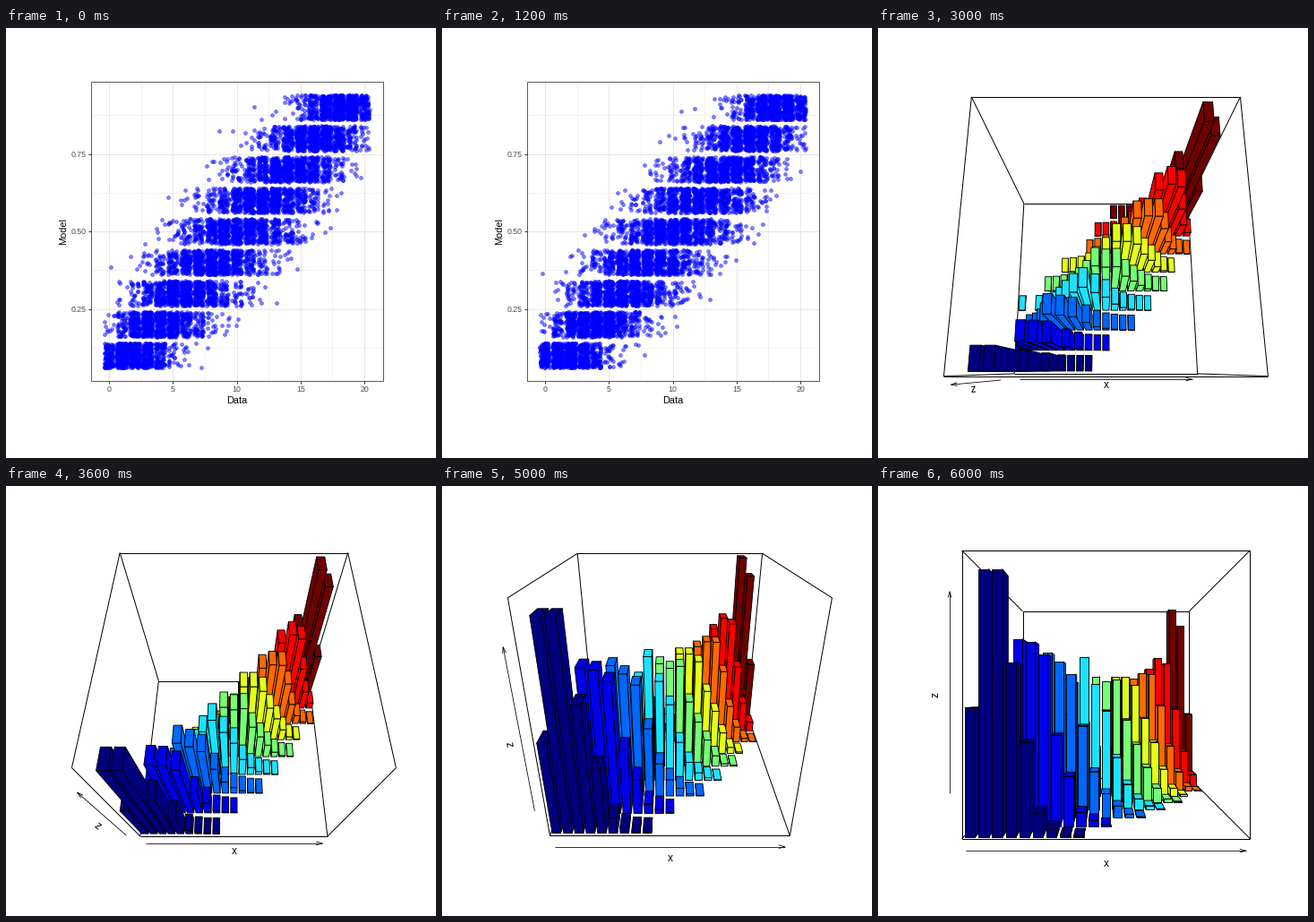
Recreate the animation shown at these times as a matplotlib script. Size 480x480 px, loop 6.6 s.

```python
import numpy as np
import matplotlib
import matplotlib.pyplot as plt
from matplotlib.animation import FuncAnimation
from matplotlib.collections import LineCollection, PolyCollection

matplotlib.rcParams["font.family"] = "Liberation Sans"

SIZE, DPI = 480, 100
STEP_MS, FRAMES = 200, 33
PX = 72 / DPI                       # one pixel in points

# Histogram per model row: first x value, then counts per thousand
ROWS = [
    (0, [136, 282, 282, 184, 100, 25, 9, 2, 1]),
    (0, [11, 57, 137, 213, 210, 196, 104, 57, 16, 7, 2]),
    (1, [7, 28, 72, 130, 201, 190, 175, 112, 56, 29, 14, 4, 1]),
    (0, [1, 0, 3, 12, 35, 75, 124, 166, 199, 164, 129, 68, 33, 14, 5, 1]),
    (3, [1, 5, 15, 37, 65, 110, 175, 168, 171, 115, 81, 49, 20, 5, 2]),
    (5, [1, 5, 14, 35, 71, 117, 176, 176, 164, 115, 80, 40, 12, 3]),
    (8, [4, 12, 31, 65, 114, 175, 183, 182, 133, 70, 30, 7, 1]),
    (9, [1, 2, 7, 22, 55, 109, 192, 210, 201, 126, 57, 19]),
    (11, [1, 1, 2, 9, 32, 90, 190, 297, 269, 116]),
]
COLORS = ["#00007f", "#0000eb", "#0068ff", "#1ae3ff", "#75ff75",
          "#e3ff1a", "#ff6800", "#ff0000", "#700000"]
CELLS = [(row, start + i, n) for row, (start, counts) in enumerate(ROWS)
         for i, n in enumerate(counts) if n]
NX, NY, TOP = 21, len(ROWS), 300

# 3D view: cube of half size 1, fitted into the plot region
DIST = np.sqrt(3) + 2
CX, CY = 254.4, 232.8
FIT_W, FIT_H = 362.0, 321.8

# Faces of a box as corner signs, with outward normal (axis, sign)
FACES = []
for axis in range(3):
    a, b = [i for i in range(3) if i != axis]
    for sign in (-1, 1):
        quad = []
        for u, v in ((-1, -1), (1, -1), (1, 1), (-1, 1)):
            p = [0, 0, 0]
            p[axis], p[a], p[b] = sign, u, v
            quad.append(tuple(p))
        FACES.append((axis, sign, quad))

fig = plt.figure(figsize=(SIZE / DPI, SIZE / DPI), dpi=DPI, facecolor="white")
ax = fig.add_axes([0, 0, 1, 1])


def reset():
    ax.clear()
    ax.set_xlim(0, SIZE)
    ax.set_ylim(SIZE, 0)
    ax.axis("off")


def text(x, y, s, size, color="black", **kw):
    ax.text(x, y, s, fontsize=size * PX, color=color, **kw)


def lines(segs, color, width, z):
    ax.add_collection(LineCollection(segs, colors=color,
                                     linewidths=width * PX, zorder=z))


# ---- jittered scatter -------------------------------------------------

def sx(v):
    return 115 + 14.25 * v


def sy(v):
    return 227 - 346 * (v - 0.5)


def draw_scatter(seed):
    left, right, top, bottom = 95, 420.5, 59.5, 394
    xs, ys = np.arange(0, 21, 5), np.array([0.25, 0.5, 0.75])
    vert = lambda vs: [[(sx(v), top), (sx(v), bottom)] for v in vs]
    horz = lambda vs: [[(left, sy(v)), (right, sy(v))] for v in vs]
    lines(vert(xs[:-1] + 2.5) + horz(np.arange(0.125, 1, 0.25)),
          "#ebebeb", 0.6, 1)
    lines(vert(xs) + horz(ys), "#e6e6e6", 1, 1)

    rng = np.random.default_rng(seed)
    n = [c[2] for c in CELLS]
    px = np.repeat([c[1] for c in CELLS], n).astype(float)
    py = np.repeat([0.1 * (c[0] + 1) for c in CELLS], n)
    px += rng.uniform(-0.4, 0.4, px.size)
    py += rng.uniform(-0.04, 0.04, py.size)
    blue = (0, 0, 1, 0.5)
    ax.scatter(sx(px), sy(py), s=(3.9 * PX) ** 2, facecolors=[blue],
               edgecolors=[blue], linewidths=0.7 * PX, zorder=2)

    ax.add_patch(plt.Rectangle((left, top), right - left, bottom - top,
                               fill=False, ec="#333333", lw=0.8 * PX, zorder=3))
    lines([[(sx(v), bottom), (sx(v), bottom + 3)] for v in xs]
          + [[(left - 3, sy(v)), (left, sy(v))] for v in ys],
          "#333333", 1, 3)
    for v in xs:
        text(sx(v), 406.2, str(v), 8.8, "#4d4d4d", ha="center", va="baseline")
    for v in ys:
        text(90, sy(v) + 3.2, f"{v:.2f}", 8.8, "#4d4d4d",
             ha="right", va="baseline")
    text(257.5, 419, "Data", 11, ha="center", va="baseline")
    text(64, 227, "Model", 11, ha="center", va="center", rotation=90)


# ---- perspective histogram --------------------------------------------

class View:
    def __init__(self, phi):
        self.s, self.c = np.sin(np.radians(phi)), np.cos(np.radians(phi))
        self.eye = DIST * np.array([0, -self.c, self.s])
        self.f, self.mid = 1, np.zeros(2)
        corners = [p for face in FACES for p in face[2]]
        q = self.raw(corners)
        lo, hi = q.min(axis=0), q.max(axis=0)
        self.f = min(FIT_W / (hi - lo)[0], FIT_H / (hi - lo)[1])
        self.mid = (lo + hi) / 2

    def raw(self, pts):
        x, y, z = np.asarray(pts, float).T
        w = DIST + y * self.c - z * self.s
        return np.column_stack([x / w, (y * self.s + z * self.c) / w])

    def __call__(self, pts):
        q = (self.raw(pts) - self.mid) * self.f
        return np.column_stack([CX + q[:, 0], CY - q[:, 1]])


def draw_box(view):
    edges = set()
    for axis, sign, quad in FACES:
        if sign * view.eye[axis] < 1:        # seen from inside
            for p, q in zip(quad, quad[1:] + quad[:1]):
                edges.add(tuple(sorted((p, q))))
    lines([view(e) for e in sorted(edges)], "black", 1, 1)


def draw_arrow(p, q):
    ang = np.arctan2(*(p - q)[::-1])
    barbs = [q + 7.2 * np.array([np.cos(ang + t), np.sin(ang + t)])
             for t in np.radians([-15, 15])]
    lines([[p, q], [barbs[0], q, barbs[1]]], "black", 0.8, 1)


def draw_axes(view):
    t, u = -1.06, -1.12
    draw_arrow(*view([(-0.95, t, t), (0.95, t, t)]))
    x, y = view([(0, u, u)])[0]
    text(x, y + 1, "x", 12, ha="center", va="center")

    p, q = view([(t, t, -0.67), (t, t, 0.7)])
    draw_arrow(p, q)
    dx, dy = q - p
    slope = 90 if abs(dx) < 0.01 else np.degrees(np.arctan(-dy / dx))
    x, y = view([(u, u, 0)])[0]
    text(x - 1, y, "z", 12, ha="center", va="center", rotation=slope)


def draw_bars(view, grow):
    def far_first(cell):
        y = (2 * cell[0] + 1) / NY - 1
        x = (2 * cell[1] + 1) / NX - 1
        return -round(abs(y - view.eye[1]), 6), -abs(x)

    polys, colors = [], []
    for row, k, n in sorted(CELLS, key=far_first):
        lo = np.array([(k + 0.125) * 2 / NX, (row + 0.125) * 2 / NY, 0]) - 1
        hi = np.array([(k + 0.875) * 2 / NX, (row + 0.875) * 2 / NY,
                       2 * grow * n / TOP]) - 1
        for axis, sign, quad in FACES:
            plane = hi[axis] if sign > 0 else lo[axis]
            if sign * (view.eye[axis] - plane) <= 0:
                continue
            polys.append(view(np.where(np.array(quad) > 0, hi, lo)))
            colors.append(COLORS[row])
    ax.add_collection(PolyCollection(polys, facecolors=colors,
                                     edgecolors="black", linewidths=0.9 * PX,
                                     joinstyle="round", zorder=2))


def draw(i):
    reset()
    if i < 7:                                # reshuffled jitter
        draw_scatter(40 + i)
        return
    phi = 90 - 5 * min(max(i - 12, 0), 18)   # tilt from above to the side
    view = View(phi)
    draw_box(view)
    if phi < 90:
        draw_axes(view)
    draw_bars(view, 0 if i < 10 else 1)


anim = FuncAnimation(fig, draw, frames=FRAMES, interval=STEP_MS,
                     init_func=reset, repeat=True, repeat_delay=0)
plt.show()
```
